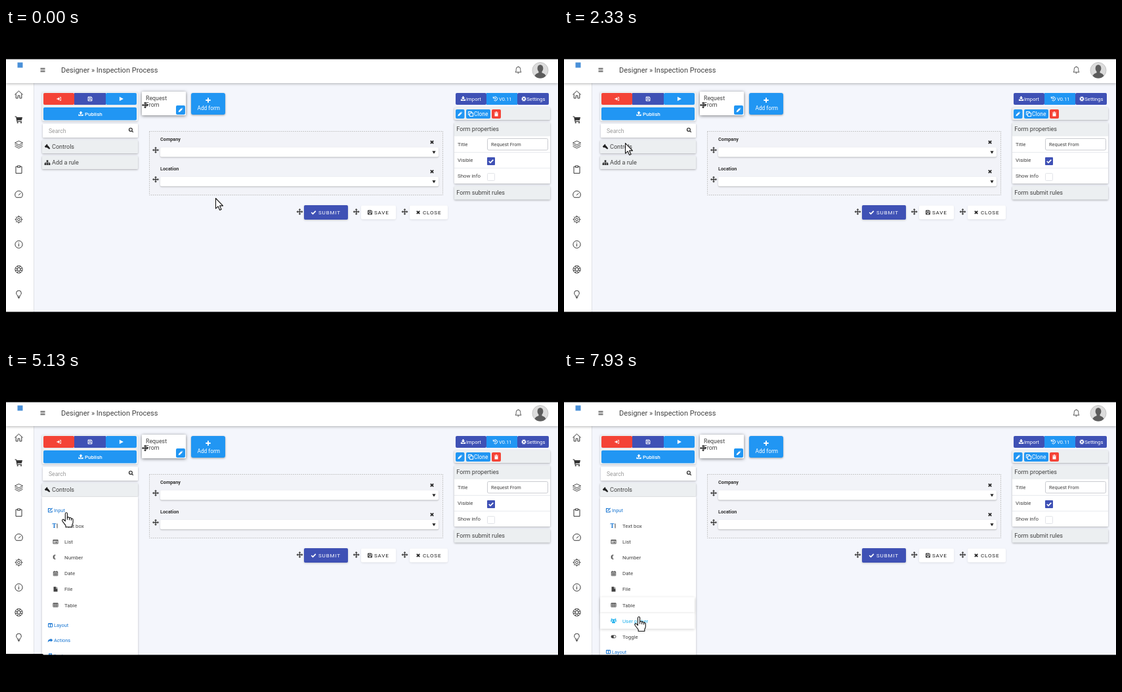
These frames come from a looping animation (841 by 480 pixels, 8 s). An HTML page with a canvas:

```html
<!DOCTYPE html>
<html lang="en">
<head>
<meta charset="utf-8">
<title>Form designer</title>
<style>
html, body { margin: 0; width: 100%; height: 100%; overflow: hidden; background: #000; }
canvas { display: block; width: 841px; height: 480px; }
</style>
</head>
<body>
<canvas id="stage"></canvas>
<script>
const W = 841, H = 480, LOOP = 8000, STEP = 1000 / 15;
const canvas = document.getElementById('stage');
const dpr = window.devicePixelRatio || 1;
canvas.width = Math.round(W * dpr);
canvas.height = Math.round(H * dpr);
const ctx = canvas.getContext('2d');

const RED = '#f44336', INDIGO = '#3f51b5', BLUE = '#2196f3', LINK = '#1976d2';
const INK = '#424242', DARK = '#222', HEAD = '#eceff1', PAGE = '#f4f6fc';

const ring = (r, x = 0, y = 0) => `M${x + r} ${y}A${r} ${r} 0 1 1 ${x - r} ${y}A${r} ${r} 0 1 1 ${x + r} ${y}Z`;

function spokes(n, r1, r2, turn = 0) {
  let d = '';
  for (let i = 0; i < n; i++) {
    const a = turn + i * 2 * Math.PI / n, c = Math.cos(a), s = Math.sin(a);
    d += `M${(c * r1).toFixed(2)} ${(s * r1).toFixed(2)}L${(c * r2).toFixed(2)} ${(s * r2).toFixed(2)}`;
  }
  return d;
}

// Each icon: path around its centre, then stroke width (0 means filled).
const ICONS = {
  home: ['M-6 0L0 -5.5L6 0M-4.3 -1V5.5H-1.4V1.5H1.4V5.5H4.3V-1', 1],
  cart: ['M-6 -5H-3.6L-3.2 -3.6H5.5L4.3 1.2H-2.2L-2 2.4H4.5V3.4H-3L-4.4 -4H-6Z' + ring(1.1, -1.8, 4.7) + ring(1.1, 3.5, 4.7), 0],
  layers: ['M0 -5.5L6 -2.5L0 .5L-6 -2.5ZM-6 0L0 3L6 0M-6 2.6L0 5.6L6 2.6', .9],
  clipboard: ['M-2 -4.5H-4.5V5.7H4.5V-4.5H2M-2 -5.7H2V-3.3H-2Z', 1],
  gauge: ['M-4 4.5A5.8 5.8 0 1 1 4 4.5ZM-.5 1.2L3 -2', 1],
  cog: [ring(4.3) + ring(1.9) + spokes(8, 4.3, 5.9), 1],
  info: [ring(5.6) + 'M0 -1V3M0 -3V-2', 1],
  buoy: [ring(5.6) + ring(2.5) + spokes(8, 2.5, 5.6, .4), 1],
  bulb: ['M-1.8 3C-1.8 1 -3.8 .5 -3.8 -2A3.8 3.8 0 0 1 3.8 -2C3.8 .5 1.8 1 1.8 3ZM-1.6 4.6H1.6M-.8 6H.8', 1],
  menu: ['M-3.5 -2.5H3.5M-3.5 0H3.5M-3.5 2.5H3.5', 1.1],
  bell: ['M-4.5 3.2C-3 2 -3.4 0 -3.2 -1.6A3.2 3.2 0 0 1 3.2 -1.6C3.4 0 3 2 4.5 3.2ZM-1.2 4.8H1.2M0 -4.8V-5.6', .9],
  enter: ['M-3 -.8H-.8V-2.6L2 0L-.8 2.6V.8H-3ZM1 -3H3.4V3H1V2.2H2.6V-2.2H1Z', 0],
  save: ['M-3 -3H2L3 -2V3H-3ZM-1.6 -3V-1H1.2V-3M-1.8 3V.6H1.8V3', .9],
  play: ['M-2.6 -3.2L3.4 0L-2.6 3.2Z', 0],
  upload: ['M0 -3.8L2.8 -.9H1V1.4H-1V-.9H-2.8ZM-3.6 1H-2V2.3H2V1H3.6V3.5H-3.6Z', 0],
  download: ['M0 1.5L2.8 -1.3H1V-3.6H-1V-1.3H-2.8ZM-3.6 1H-2L0 2.7L2 1H3.6V3.5H-3.6Z', 0],
  search: [ring(2.4, -.6, -.6) + 'M1.2 1.2L3.3 3.3', 1.2],
  gavel: ['M-4.2 -.6L-.6 -4.2L.5 -3.1L0 -2.6L1.7 -.9L4.3 2.4L3 3.7L-.6 1.2L-2 .9L-2.6 1.5Z', 0],
  tree: ['M-1.3 -3.8H1.3V-1.4H.5V-.4H3.6V1H4.4V3.6H1.8V1H2.8V.4H.4V1H1.3V3.6H-1.3V1H-.4V.4H-2.8V1H-1.8V3.6H-4.4V1H-3.6V-.4H-.5V-1.4H-1.3Z', 0],
  plus: ['M-3.7 0H3.7M0 -3.7V3.7', 1.9],
  pencil: ['M-3.3 3.3L-2.8 1L1 -2.8L2.8 -1L-1 2.8ZM1.5 -3.2L2.1 -3.6L3.6 -2.1L3.2 -1.5Z', 0],
  move: ['M0 -5L2 -2.8H.7V-.7H2.8V-2L5 0L2.8 2V.7H.7V2.8H2L0 5L-2 2.8H-.7V.7H-2.8V2L-5 0L-2.8 -2V-.7H-.7V-2.8H-2Z', 0],
  cross: ['M-2.2 -2.2L2.2 2.2M2.2 -2.2L-2.2 2.2', 1.7],
  check: ['M-3.2 0L-1 2.3L3.3 -2.2', 1.8],
  caret: ['M-2.6 -2H2.6L0 2.2Z', 0],
  history: ['M-2.4 -1.6A3 3 0 1 1 -2 2.2M-3.2 -3.2V-.8H-.8M.4 -1.4V.6H-.8', 1],
  gear: [ring(1.9) + spokes(8, 2.2, 3.7, .39), 1.4],
  clone: ['M-1.5 -1.5H3.6V3.6H-1.5ZM-1.6 1.4H-3.6V-3.6H1.4V-1.6', 1],
  trash: ['M-3 -2.6H-1V-3.5H1V-2.6H3V-1.7H-3ZM-2.5 -1.2H2.5V3.4H-2.5Z', 0],
  edit: ['M1 -2.5H-3V3H2.6V.8M-1 1L3.2 -3.2', 1.1],
  layout: ['M-3 -2.6H3V2.6H-3ZM0 -2.6V2.6M-3 -2.2H3', 1],
  share: ['M.6 -3.2L3.8 -.5L.6 2.2V.7C-1.6 .6 -2.8 1.2 -3.6 3C-3.9 -.4 -2 -1.8 .6 -1.8Z', 0],
  custom: ['M-2.5 -3.5H2.5V3.5H-2.5ZM-1.6 -2.4V-1.5H1.6V-2.4ZM-1.6 -.4V.4H1.6V-.4ZM-1.6 1.5V2.3H1.6V1.5Z', 0],
  list: ['M-3.6 -2.8H3.6V2.8H-3.6ZM-3.6 -2H3.6M-2.5 -.2H-1.6M-.8 -.2H2.5M-2.5 1.4H-1.6M-.8 1.4H2.5', .9],
  date: ['M-3.2 -2.6H3.2V3.4H-3.2ZM-3.2 -1.4H3.2M-1.7 -3.8V-2M1.7 -3.8V-2M-3 1H3M-1 -.8V3.2M1 -.8V3.2', .9],
  file: ['M-3 -3.8H.6V-1H3V3.8H-3ZM1.2 -3.8L3 -1.7H1.2Z', 0],
  table: ['M-3.6 -2.8H3.6V2.8H-3.6ZM-3.6 -1.8H3.6M-3.6 .5H3.6M-1.2 -2.8V2.8M1.2 -2.8V2.8', .9],
  users: [ring(1.6, 0, -1.2) + ring(1.2, -2.8, -2.2) + ring(1.2, 2.8, -2.2) + 'M-2.4 3.6V1.6L-1.4 .6H1.4L2.4 1.6V3.6ZM-4.4 1V-.6H-2.2L-2.6 1ZM4.4 1V-.6H2.2L2.6 1Z', 0],
  toggle: ['M-1.6 -2.4H1.6A2.4 2.4 0 0 1 1.6 2.4H-1.6A2.4 2.4 0 0 1 -1.6 -2.4Z' + ring(1.6, 1.6, 0), 0]
};
for (const k in ICONS) ICONS[k][0] = new Path2D(ICONS[k][0]);

const ARROW = new Path2D('M0 0V15.6L3.6 12.3L6.2 18L8.6 17L6.1 11.4H11Z');
const HAND = new Path2D('M-1.5 2Q-1.5 0 0 0Q1.6 0 1.6 2V8Q2 6.7 3.3 6.8Q4.6 7 4.7 8.4Q5.3 7.4 6.5 7.7Q7.6 8 7.6 9.3Q8.6 8.6 9.4 9.2Q10.3 9.8 10.3 11V15Q10.2 17 8.8 19V22H-.8V19.5L-5.5 13.5Q-6.8 11.8 -5.8 10.8Q-4.6 9.8 -3.2 11.2L-1.5 13Z');
const KNUCKLES = new Path2D('M1.6 7V11M4.7 8.5V11.5M7.6 9.3V12');

function icon(name, x, y, color = INK) {
  const [path, width] = ICONS[name];
  ctx.save();
  ctx.translate(x, y);
  if (width) {
    ctx.strokeStyle = color;
    ctx.lineWidth = width;
    ctx.stroke(path);
  } else {
    ctx.fillStyle = color;
    ctx.fill(path, 'evenodd');
  }
  ctx.restore();
}

function text(s, x, y, size, color = INK, weight = 400, spacing = 0) {
  ctx.font = `${weight} ${size}px Roboto, sans-serif`;
  ctx.letterSpacing = spacing + 'px';
  ctx.fillStyle = color;
  ctx.fillText(s, x, y);
}

function box(x, y, w, h, color, r = 0, shadow = 0, blur = 3) {
  ctx.save();
  if (shadow) {
    ctx.shadowColor = `rgba(0,0,0,${shadow})`;
    ctx.shadowBlur = blur * dpr;
    ctx.shadowOffsetY = dpr;
  }
  ctx.fillStyle = color;
  ctx.beginPath();
  ctx.roundRect(x, y, w, h, r);
  ctx.fill();
  ctx.restore();
}

function frame(x, y, w, h, color, r = 0) {
  ctx.strokeStyle = color;
  ctx.lineWidth = 1;
  ctx.beginPath();
  ctx.roundRect(x, y, w, h, r);
  ctx.stroke();
}

// Cubic-bezier(.25, .1, .25, 1), the CSS "ease" curve.
function ease(p) {
  if (p <= 0) return 0;
  if (p >= 1) return 1;
  let lo = 0, hi = 1, u = p;
  for (let i = 0; i < 24; i++) {
    const x = .75 * u * (1 - u) + u * u * u;
    if (x < p) lo = u; else hi = u;
    u = (lo + hi) / 2;
  }
  return .3 * u * (1 - u) * (1 - u) + 3 * u * u * (1 - u) + u * u * u;
}

// Pointer path: time, x, y and the easing used to arrive there.
const PATH = [
  [0, 319.5, 259.5], [133, 319.5, 259.5], [267, 314.5, 248.5],
  [467, 314.5, 248.5], [667, 316, 256], [800, 316, 256],
  [1267, 258, 220.5], [1667, 199.5, 197.5, 'out'], [1733, 196, 196.5],
  [2333, 93.5, 175.5, 'out'], [2467, 91.5, 180.5], [3470, 91.5, 180.5],
  [4000, 91.5, 201], [4600, 91.8, 215.8, 'out'], [5600, 91.8, 215.8],
  [6467, 100, 247], [7000, 105.5, 301.5], [7333, 108, 322], [7933, 114, 374.5]
];

function pointer(t) {
  let i = 1;
  while (i < PATH.length - 1 && PATH[i][0] < t) i++;
  const [t0, x0, y0] = PATH[i - 1], [t1, x1, y1, kind] = PATH[i];
  let p = Math.min(1, Math.max(0, (t - t0) / (t1 - t0)));
  if (kind === 'out') p = 1 - (1 - p) * (1 - p);
  return [x0 + (x1 - x0) * p, y0 + (y1 - y0) * p];
}

const ROWS = [['Text box'], ['List', 'list'], ['Number'], ['Date', 'date'], ['File', 'file'],
  ['Table', 'table'], ['User picker', 'users'], ['Toggle', 'toggle']];
const ROW_TOP = 224, ROW_H = 24.1;

function hoverRow(t) {
  return t < 5300 ? -1 : Math.floor((pointer(t)[1] + 1 - ROW_TOP) / ROW_H);
}

// Share of the last 250 ms spent on a row, which fades its shadow.
function lift(row, t) {
  let n = 0;
  for (let k = 0; k < 5; k++) if (hoverRow(t - k * 50) === row) n++;
  return n / 5;
}

function shell() {
  box(0, 0, W, H, PAGE);
  box(0, 84, 42, 350, '#fff');
  box(42, 84, 1, 350, '#dfe1e6');
  box(0, 48, W, 36, '#fff', 0, .3, 4);
  box(17.5, 52.5, 8, 8, '#4a90d9');
  icon('menu', 56, 64, DARK);
  text('Designer » Inspection Process', 84, 67.5, 11);
  icon('bell', 780.5, 64);

  ctx.save();
  ctx.beginPath();
  ctx.arc(814, 64.5, 12, 0, 7);
  ctx.fillStyle = '#dcdcdc';
  ctx.fill();
  ctx.strokeStyle = '#c4c4c4';
  ctx.lineWidth = 1;
  ctx.stroke();
  ctx.clip();
  ctx.fillStyle = '#5c5c5c';
  ctx.beginPath();
  ctx.ellipse(814, 61.5, 4.4, 5.6, 0, 0, 7);
  ctx.fill();
  ctx.beginPath();
  ctx.ellipse(814, 75, 9, 7, 0, 0, 7);
  ctx.fill();
  box(811.5, 65, 5, 5, '#5c5c5c');
  ctx.restore();

  ['home', 'cart', 'layers', 'clipboard', 'gauge', 'cog', 'info', 'buoy', 'bulb']
    .forEach((name, i) => icon(name, 19.5, 101.5 + i * 38.05, '#333'));
}

function leftPanel(t) {
  const open = 109.5 * ease((t - 3145) / 350);
  const more = 192 * ease((t - 4963) / 350);

  box(55, 97, 146, 45, HEAD, 1, .2);
  box(57, 99, 47, 18, RED, 2);
  box(104, 99, 48, 18, INDIGO);
  box(152, 99, 47, 18, BLUE, 2);
  icon('enter', 80.5, 108, '#fff');
  icon('save', 128, 108, '#fff');
  icon('play', 175.5, 108, '#fff');
  box(57, 121, 142, 19.5, BLUE, 2);
  icon('upload', 114, 130.5, '#fff');
  text('Publish', 120, 133.5, 8, '#fff', 500);

  box(56, 146, 145, 21, '#fff', 1, .28);
  text('Search', 65, 159.5, 8.6, '#9a9a9a');
  icon('search', 190.5, 155.5, DARK);

  box(55, 171, 146, 20, HEAD, 1, .3);
  icon('gavel', 63, 181, DARK);
  text('Controls', 70, 184.2, 9.05);

  if (open) {
    box(55, 191.5, 146, open + more, '#fff', 0, .25);
    ctx.save();
    ctx.beginPath();
    ctx.rect(50, 191.5, 156, open + more);
    ctx.clip();
    icon('edit', 67.5, 212, LINK);
    text('Input', 73, 215, 7.45, LINK);
    [['Layout', 'layout', 73], ['Actions', 'share', 73], ['Custom', 'custom', 72]].forEach(([s, name, x], i) => {
      const y = 236 + i * 23.2 + more;
      icon(name, 67.5, y, LINK);
      text(s, x, y + 2.8, 7.45, LINK);
    });
    if (more) controlRows(t, more);
    ctx.restore();
  }

  const y = 195 + open + more;
  box(55, y, 146, 20, HEAD, 1, .3);
  icon('tree', 63, y + 10.2, DARK);
  text('Add a rule', 70, y + 13.2, 9.1);
}

function controlRows(t, height) {
  ctx.save();
  ctx.beginPath();
  ctx.rect(50, 191, 156, 33 + height);
  ctx.clip();
  const active = hoverRow(t);
  ROWS.forEach((row, i) => {
    const a = lift(i, t);
    if (a) box(55, ROW_TOP + i * ROW_H, 144, ROW_H, '#fff', 0, .42 * a, 4);
  });
  ROWS.forEach(([label, name], i) => {
    const y = ROW_TOP + 12.1 + i * ROW_H;
    const color = i === active ? '#1fb0ec' : INK;
    if (name) icon(name, 75.5, y, color);
    else if (i === 2) text('€', 71, y + 3, 8.5, color, 700);
    else {
      ctx.font = '700 9px "Noto Serif", serif';
      ctx.fillText('T', 70.5, y + 3.2);
      box(77.5, y - 3.5, 1, 7, color);
    }
    text(label, 89, y + 2.9, 7.9, color);
  });
  ctx.restore();
}

function tabs() {
  box(207, 97, 67, 36, '#fff', 1, .5, 5);
  text('Request', 213, 110.3, 8.8);
  text('From', 213, 120.3, 8.8);
  icon('move', 212, 117.5, DARK);
  box(259, 118, 14, 14, BLUE, 2);
  icon('pencil', 266, 125, '#fff');
  box(282, 99, 52, 33, BLUE, 3, .35);
  icon('plus', 308, 110, '#fff');
  text('Add form', 291.5, 124.7, 8.3, '#fff');
}

function field(label, y) {
  text(label, 235, y + 2.8, 7.3, '#333', 700);
  icon('cross', 649, y + 5, DARK);
  box(235, y + 13, 424, 14.5, '#fff', 2, .25, 2);
  icon('caret', 652, y + 20.5, DARK);
  icon('move', 228, y + 17, INK);
}

function formArea() {
  box(218.5, 157.5, 447, 97, '#f2f3f8');
  ctx.setLineDash([1.5, 1.5]);
  frame(218.5, 157.5, 447, 97, '#bbb');
  ctx.setLineDash([]);
  field('Company', 169);
  field('Location', 213.8);

  for (const x of [447.5, 533.7, 607.5]) icon('move', x, 280, INK);
  box(454, 270, 67, 22, INDIGO, 2, .2);
  icon('check', 468.5, 281, '#fff');
  text('SUBMIT', 476, 283.8, 8.1, '#fff', 400, .8);
  box(541, 270.5, 53, 21, '#fff', 2, .1);
  icon('save', 554.5, 281, DARK);
  text('SAVE', 561, 283.8, 8.1, DARK, 400, .8);
  box(615, 270.5, 58, 21, '#fff', 2, .1);
  icon('cross', 628, 281, DARK);
  text('CLOSE', 635, 283.8, 8.1, DARK, 400, .8);
}

function rightPanel() {
  box(685, 99, 47, 18, INDIGO, 2);
  box(732, 99, 47, 18, BLUE);
  box(779, 99, 48, 18, INDIGO, 2);
  icon('download', 696.5, 107.5, '#fff');
  text('Import', 701, 110.7, 7.7, '#fff');
  icon('history', 745.5, 107.8, '#fff');
  text('V0.11', 751, 110.7, 7.5, '#fff');
  icon('gear', 789, 108, '#fff');
  text('Settings', 793.3, 110.7, 7.7, '#fff');

  box(683, 121, 146, 19, HEAD, 1, .3);
  box(685, 124, 13.5, 14, BLUE, 2);
  icon('pencil', 691.7, 131, '#fff');
  box(701, 124, 37, 14, BLUE, 2);
  icon('clone', 708, 131, '#fff');
  text('Clone', 713, 134, 8.4, '#fff');
  box(740, 124, 14, 14, RED, 2);
  icon('trash', 747, 131, '#fff');

  box(683, 144, 146, 93, '#fff', 1, .3);
  box(683, 144, 146, 21, HEAD, 1);
  text('Form properties', 686.3, 157, 9.12);
  box(683, 189, 146, 1, '#e8eaee');
  box(683, 213, 146, 1, '#e8eaee');
  text('Title', 688, 179.5, 7.9);
  text('Visible', 688, 204, 7.9);
  text('Show info', 688, 228.3, 7.9);
  frame(733.5, 168.5, 92, 17.5, '#c9cbd0', 2);
  text('Request From', 739, 180.2, 7.4);
  box(733, 197, 12, 12, INDIGO, 1);
  icon('check', 739, 203, '#fff');
  frame(733.5, 221.5, 11, 11, '#e2e4e8', 1);

  box(683, 241, 146, 20.5, HEAD, 1, .3);
  text('Form submit rules', 686.3, 254, 9.12);
}

function bars(t) {
  box(0, 0, W, 47.5, '#000');
  box(0, 432.5, W, 48, '#000');
  const shown = Math.min(1, Math.max(0, (t - 2533) / 200));
  if (!shown || t > 5790) return;
  ctx.globalAlpha = shown;
  box(0, 431, t < 4330 ? 144 : 57, 4, '#000', [0, 2, 0, 0]);
  ctx.globalAlpha = 1;
}

function cursor(t) {
  const [x, y] = pointer(t), hand = t > 2390;
  const shape = hand ? HAND : ARROW;
  ctx.save();
  ctx.translate(x, y);
  ctx.fillStyle = '#fff';
  ctx.strokeStyle = '#111';
  ctx.lineWidth = 1.1;
  ctx.lineJoin = 'round';
  ctx.fill(shape);
  ctx.stroke(shape);
  if (hand) ctx.stroke(KNUCKLES);
  ctx.restore();
}

function draw(now) {
  // The picture advances at 15 steps a second.
  const t = Math.floor((now % LOOP + 7) / STEP) * STEP;
  ctx.setTransform(dpr, 0, 0, dpr, 0, 0);
  shell();
  leftPanel(t);
  tabs();
  formArea();
  rightPanel();
  bars(t);
  cursor(t);
}

const start = performance.now();
function tick() {
  draw(performance.now() - start);
  requestAnimationFrame(tick);
}
tick();
</script>
</body>
</html>
```
